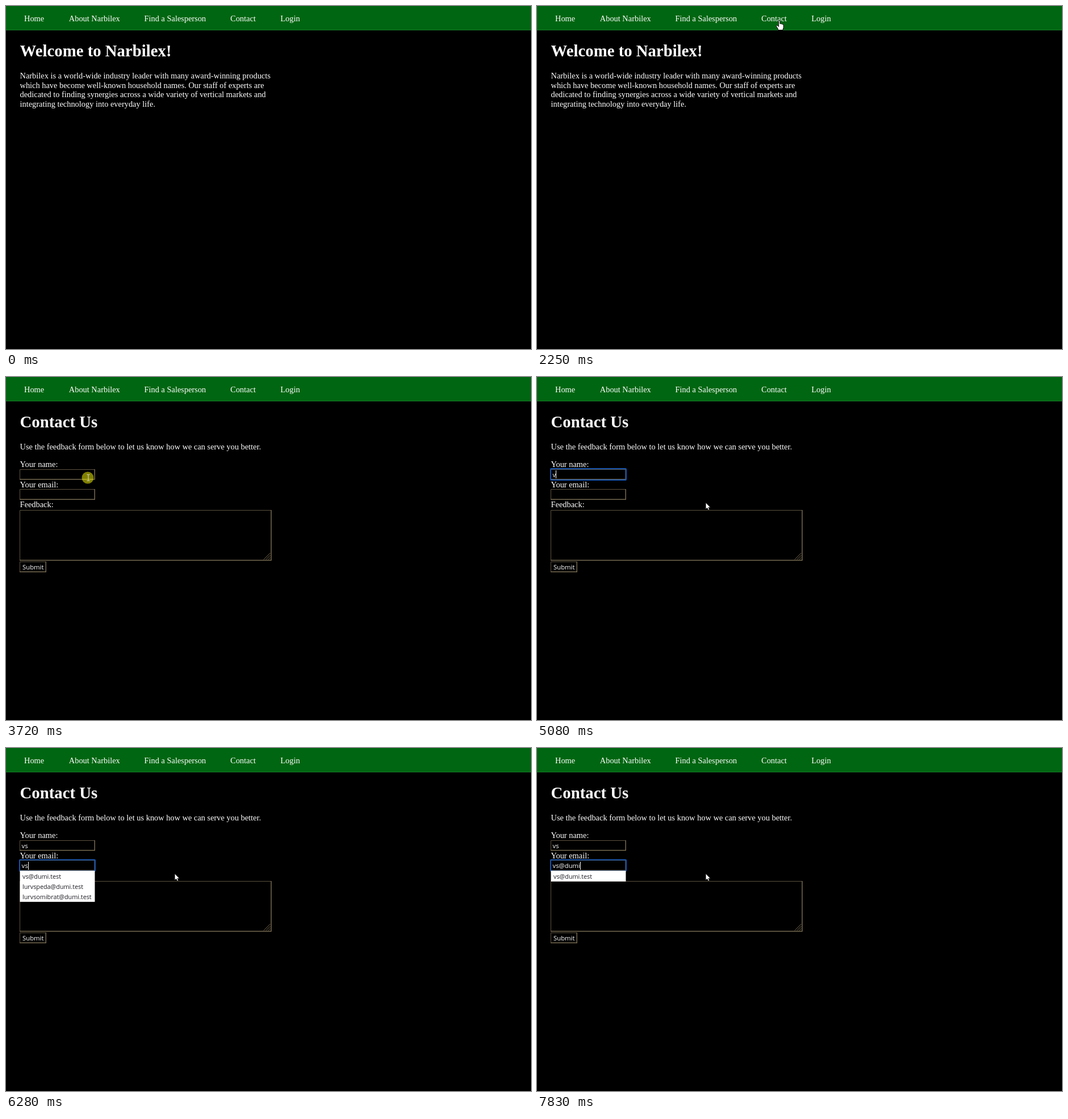
An HTML page that plays this animation: 925 px wide and 606 px high, repeating every 8000 ms.

```html
<!DOCTYPE html>
<html lang="en">
<head>
<meta charset="utf-8">
<title>Contact form</title>
<style>
  html, body { margin: 0; width: 100%; height: 100%; overflow: hidden; background: #000; }
  svg { display: block; }
  text { fill: #fff; font: 14.4px "Liberation Serif", "Times New Roman", serif; white-space: pre; }
  .title { font-size: 28.8px; font-weight: bold; }
  .field { font: 11.3px "Open Sans", "Noto Sans", sans-serif; }
  .option { font: 10.8px "Open Sans", "Noto Sans", sans-serif; fill: #1c1c24; }
</style>
</head>
<body>
<svg id="stage" width="925" height="606" viewBox="0 0 925 606">
  <rect width="925" height="606"/>
  <rect width="925" height="42" fill="#006611"/>
  <rect y="42" width="925" height="1" fill="#1b7a2c"/>
  <g id="nav"></g>
  <g id="home"></g>
  <g id="contact">
    <g id="form"></g>
    <path d="M454 322.5L465.5 311M458 322.5L465.5 315M462 322.5L465.5 319" stroke="#7a6d56" fill="none"/>
    <rect id="ring" x="24" width="133" height="20" rx="1" fill="none" stroke="#1753ab" stroke-width="2"/>
    <text id="name" class="field" x="27.5" y="177"></text>
    <text id="email" class="field" x="27.5" y="212"></text>
    <rect id="caret" width="1" height="14" fill="#fff"/>
    <g id="menu"></g>
  </g>
  <circle id="click" r="10.5" fill="#ff0" fill-opacity=".5"/>
  <g id="pointer" stroke-linejoin="round">
    <path id="arrow" d="M0 0V11.5L2.6 9.1L4.4 13L6.3 12.1L4.6 8.4H8.2Z" fill="#fff" stroke="#000" stroke-width=".6"/>
    <path id="hand" d="M-1.2 .8Q0 -1 1.2 .8V6Q2.6 5 3.6 6.4Q5 5.6 5.8 7Q7.3 6.6 7.4 8.4V12Q7 14.5 6 17H-1.8Q-2.6 14 -4.2 12.2L-5.6 9.6Q-5 7.6 -3 9.2L-1.2 11Z" fill="#fff" stroke="#000"/>
    <path id="beam" d="M-2.5 -5.5H-.6L0 -5L.6 -5.5H2.5M0 -5V5M-2.5 5.5H-.6L0 5L.6 5.5H2.5" fill="none" stroke="#ddd"/>
  </g>
</svg>
<script>
const $ = id => document.getElementById(id);
const show = (id, on) => $(id).setAttribute("display", on ? "inline" : "none");

function add(parent, tag, attrs, content = "") {
  const el = document.createElementNS("http://www.w3.org/2000/svg", tag);
  for (const key in attrs) el.setAttribute(key, attrs[key]);
  el.textContent = content;
  $(parent).append(el);
}
const write = (parent, x, y, content, cls = "") => add(parent, "text", { x, y, class: cls }, content);

function inset(x, y, w, h) {
  const edge = (d, stroke, width) => add("form", "path", { d, stroke, "stroke-width": width, fill: "none" });
  edge(`M${x + .5} ${y + h}V${y + .5}H${x + w}`, "#5b513f", 1);
  edge(`M${x + w - .75} ${y}V${y + h - .75}H${x}`, "#75684f", 1.5);
}

[["Home", 32], ["About Narbilex", 110.8], ["Find a Salesperson", 243.6], ["Contact", 395.3], ["Login", 483.5]]
  .forEach(([label, x]) => write("nav", x, 27, label));

write("home", 24.5, 88.5, "Welcome to Narbilex!", "title");
["Narbilex is a world-wide industry leader with many award-winning products",
 "which have become well-known household names. Our staff of experts are",
 "dedicated to finding synergies across a wide variety of vertical markets and",
 "integrating technology into everyday life."]
  .forEach((line, i) => write("home", 24.5, 128 + i * 16.55, line));

write("form", 24.5, 88.5, "Contact Us", "title");
write("form", 24.5, 128, "Use the feedback form below to let us know how we can serve you better.");
write("form", 24.5, 159, "Your name:");
write("form", 24.5, 195, "Your email:");
write("form", 24.5, 230, "Feedback:");
inset(24, 163, 133, 18.5);
inset(24, 198, 133, 19);
inset(24, 235, 444, 89.5);
inset(24, 326, 47, 19);
write("form", 29, 340, "Submit", "field");

const mails = ["vs@dumi.test", "lurvspeda@dumi.test", "lurvsomibrat@dumi.test"];
const names = ["vs", "vs omi", "vs peda", "vs brat"];

// time, name, email, focused field, caret on, suggestions
const states = [
  [0, "", "", "", 0, []],
  [3790, "", "", "name", 1, []],
  [4270, "", "", "name", 0, []],
  [4820, "", "", "name", 1, []],
  [5080, "v", "", "name", 1, []],
  [5150, "v", "", "name", 1, names],
  [5280, "vs", "", "name", 1, names],
  [5410, "vs", "", "email", 1, []],
  [6010, "vs", "v", "email", 1, []],
  [6080, "vs", "v", "email", 1, mails],
  [6150, "vs", "vs", "email", 1, mails],
  [6540, "vs", "vs", "email", 0, mails],
  [7000, "vs", "vs@", "email", 1, mails],
  [7070, "vs", "vs@", "email", 1, mails.slice(0, 1)],
  [7290, "vs", "vs@d", "email", 1, mails.slice(0, 1)],
  [7560, "vs", "vs@du", "email", 1, mails.slice(0, 1)],
  [7700, "vs", "vs@dum", "email", 1, mails.slice(0, 1)],
  [7830, "vs", "vs@dumi", "email", 1, mails.slice(0, 1)]
];

// time, x, y of the pointer
const path = [
  [200, 779, 563], [520, 600, 260], [760, 411, 110], [960, 478, 51], [1090, 474, 50],
  [1560, 434, 40], [1760, 433, 39.5], [2040, 428, 30], [2150, 423, 15], [2250, 427, 25.5],
  [2380, 427, 25.5], [2510, 426, 32], [3000, 426, 32], [3620, 145, 178], [3860, 145, 178], [4270, 297.3, 222]
];

function pointerAt(t) {
  const i = path.findIndex(p => p[0] > t);
  if (i < 0) return path[path.length - 1].slice(1);
  if (!i) return path[0].slice(1);
  const [t0, x0, y0] = path[i - 1], [t1, x1, y1] = path[i];
  const k = (t - t0) / (t1 - t0);
  return [x0 + (x1 - x0) * k, y0 + (y1 - y0) * k];
}

let current;
function setState(state) {
  if (state === current) return;
  current = state;
  const [, name, email, focus, caret, options] = state;
  $("name").textContent = name;
  $("email").textContent = email;
  const top = focus === "email" ? 197.5 : 162;
  $("ring").setAttribute("y", top);
  show("ring", focus);
  show("caret", caret);
  if (focus) {
    const width = $(focus).textContent ? $(focus).getComputedTextLength() : 0;
    $("caret").setAttribute("x", Math.round(27.7 + width));
    $("caret").setAttribute("y", focus === "email" ? 201 : 165);
  }
  $("menu").replaceChildren();
  if (options.length) {
    const y = focus === "email" ? 217 : 181.5;
    add("menu", "rect", { x: 24.5, y, width: 132, height: options.length * 18 + .8, fill: "#fff" });
    options.forEach((o, i) => write("menu", 29, y + 13.8 + i * 18, o, "option"));
  }
}

function render() {
  const t = performance.now() % 8000;
  const within = (a, b) => t >= a && t < b;
  show("home", t < 2970);
  show("contact", t >= 2970);
  setState(states.findLast(s => s[0] <= t));

  const [x, y] = pointerAt(t);
  const hand = within(2040, 3030), beam = within(3560, 3900);
  $("pointer").setAttribute("transform", `translate(${x} ${y})`);
  show("pointer", t >= 200);
  show("hand", hand);
  show("beam", beam);
  show("arrow", !hand && !beam);
  $("click").setAttribute("cx", x - 1);
  $("click").setAttribute("cy", y);
  show("click", within(2840, 3000) || within(3660, 3860));
  requestAnimationFrame(render);
}
render();
</script>
</body>
</html>
```
